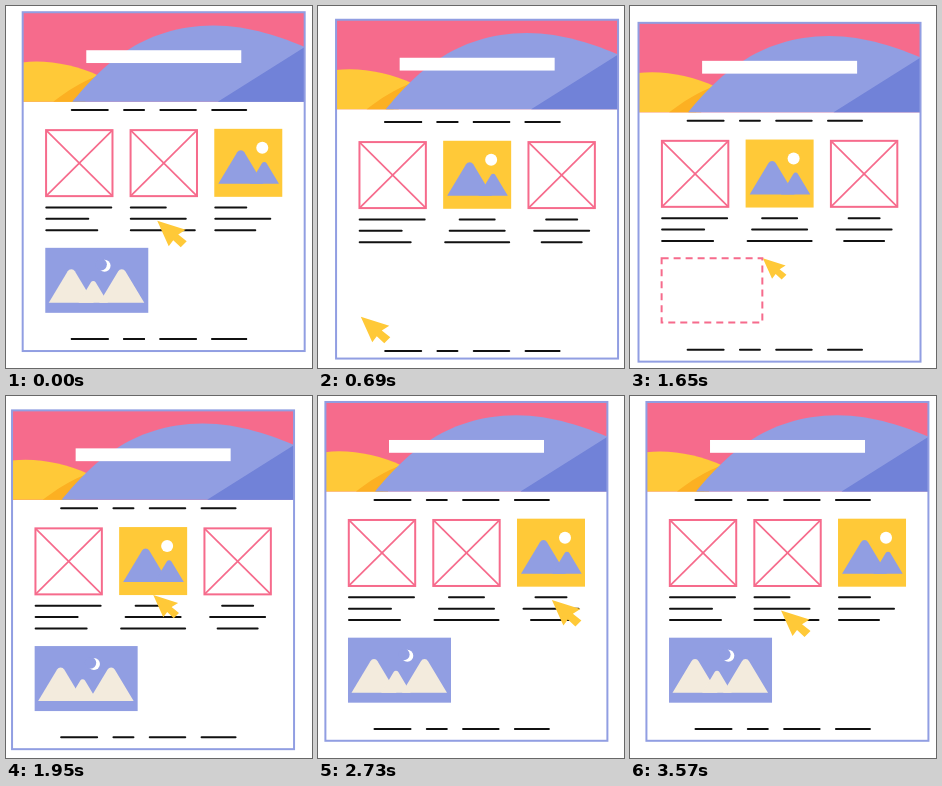
An HTML page with a canvas that plays this animation: 306 px wide and 362 px high, repeating every 3.6 s.

```html
<!DOCTYPE html>
<html lang="en">
<head>
<meta charset="utf-8">
<title>Page builder</title>
<style>
html, body { margin: 0; width: 306px; height: 362px; overflow: hidden; background: #fff; }
canvas { display: block; }
</style>
</head>
<body>
<canvas width="306" height="362"></canvas>
<script>
const ctx = document.querySelector('canvas').getContext('2d');
const LOOP = 3600, PITCH = 229, DRIFT = 6.75;
const PINK = '#f66b8c', BLUE = '#919ee2', DARK = '#7182d8',
      YELLOW = '#ffc938', ORANGE = '#fcb022', CREAM = '#f3ebdd', INK = '#111';
const NAV = [37, 21, 36.5, 35];
const TEXT = [[66, 43, 52], [36, 56, 65], [32, 56, 41]];
const columnX = i => 40 + 84.5 * i;
const cell = { x: 40, y: 242, w: 103, h: 65 };

const step = (start, end, x, y, drag = false) => ({ start, end, x, y, drag });
const scrolling = step(0, 840, cell.x, cell.y + cell.h - 2);
const drawing = step(950, 1770, cell.x + cell.w, cell.y - 1, true);
const reaching = step(1770, 1950, 158.6, 191);
const swapping = step(1980, 2560, 243.1, 191, true);
const aligningLast = step(2620, 2960, 244.5, 214.7);
const aligningMiddle = step(3000, 3480, 152, 214.7);
const STEPS = [scrolling, drawing, reaching, swapping, aligningLast, aligningMiddle];

const clamp = v => Math.min(1, Math.max(0, v));
const mix = (a, b, k) => a + (b - a) * k;

// cubic-bezier(.25, .1, .25, 1)
function ease(x) {
  let lo = 0, hi = 1, s = 0;
  for (let i = 0; i < 20; i++) {
    s = (lo + hi) / 2;
    if (.75 * s * (1 - s) + s ** 3 < clamp(x)) lo = s; else hi = s;
  }
  return .3 * s * (1 - s) ** 2 + 3 * s * s * (1 - s) + s ** 3;
}

const progress = (t, { start, end }) => ease((t - start) / (end - start));

function fill(color, path) {
  ctx.fillStyle = color;
  ctx.fill(new Path2D(path));
}

function rect(color, x, y, w, h) {
  ctx.fillStyle = color;
  ctx.fillRect(x, y, w, h);
}

function line(x1, y1, x2, y2) {
  ctx.beginPath();
  ctx.moveTo(x1, y1);
  ctx.lineTo(x2, y2);
  ctx.stroke();
}

function pen(color, width, cap = 'butt') {
  ctx.strokeStyle = color;
  ctx.lineWidth = width;
  ctx.lineCap = cap;
}

function at(x, y, draw) {
  ctx.save();
  ctx.translate(x, y);
  draw();
  ctx.restore();
}

function circle(color, x, y, r) {
  ctx.fillStyle = color;
  ctx.beginPath();
  ctx.arc(x, y, r, 0, 7);
  ctx.fill();
}

function peak(color, x, height) {
  const base = 55, half = height * .6;
  ctx.fillStyle = color;
  ctx.beginPath();
  ctx.moveTo(x - half, base);
  ctx.arcTo(x, base - height, x + half, base, height / 9);
  ctx.lineTo(x + half, base);
  ctx.fill();
}

function placeholder(x) {
  at(x, 123.5, () => {
    pen(PINK, 2);
    ctx.strokeRect(.8, .8, 66.4, 66);
    pen(PINK, 1.7);
    line(1, 1, 67, 66.5);
    line(67, 1, 1, 66.5);
  });
}

function dayPicture(x) {
  at(x, 123, () => {
    rect(YELLOW, 0, 0, 68, 68);
    circle('#fff', 48, 19, 6);
    peak(BLUE, 26.5, 37.5);
    peak(BLUE, 50, 24.5);
  });
}

function nightPicture() {
  at(cell.x, cell.y, () => {
    rect(BLUE, 0, 0, cell.w, cell.h);
    circle('#fff', 59.3, 18, 6);
    circle(BLUE, 55.8, 16.8, 5.8);
    peak(CREAM, 26, 37.5);
    peak(CREAM, 48, 24.5);
    peak(CREAM, 76.5, 37.5);
  });
}

function navigation(y) {
  let x = 66;
  for (const w of NAV) {
    line(x + .5, y, x + w - .5, y);
    x += w + 15.3;
  }
}

function content(offset, { swap, left, night }) {
  at(0, offset, () => {
    placeholder(columnX(0));
    placeholder(columnX(2 - swap));
    dayPicture(columnX(1 + swap));
    if (night) nightPicture();
    pen(INK, 2, 'round');
    navigation(104.3);
    navigation(104.3 + PITCH);
    TEXT.forEach((widths, col) => widths.forEach((w, row) => {
      const x = columnX(col) + (left[col] ? .5 : 34 - w / 2);
      const y = 201.6 + row * 11.4;
      line(x + .5, y, x + w - .5, y);
    }));
  });
}

function header() {
  rect(PINK, 17, 6, 282.5, 89.8);
  fill(YELLOW, 'M17 56.5C42 53.5 70 59 94 70L75 95.8H17Z');
  fill(ORANGE, 'M48 95.8C62 85 76 76 93 69.6L80 95.8Z');
  fill(BLUE, 'M67 95.8C95 62 135 20 208 19.5C245 19.5 278 32 299.5 41V95.8Z');
  fill(DARK, 'M212.5 95.8L299.5 41V95.8Z');
  rect('#fff', 81, 44.3, 155, 12.8);
}

function cursorAt(t) {
  let { x, y } = aligningMiddle, press = 0;
  for (const s of STEPS) {
    const k = progress(t, s);
    x = mix(x, s.x, k);
    y = mix(y, s.y, k);
    if (s.drag) press += clamp((t - s.start) / 80 + 1) - clamp((t - s.end) / 80 + 1);
  }
  return { x, y, press };
}

function cursor({ x, y, press }) {
  at(x, y, () => {
    ctx.scale(1 - .2 * press, 1 - .2 * press);
    fill(YELLOW, 'M0 0L28.5 9L21 13.8L29.5 20.5L23.5 26.5L16 19.5L11.5 25.5Z');
  });
}

function selection({ x, y }) {
  pen(PINK, 2);
  ctx.setLineDash([7, 5]);
  ctx.strokeRect(cell.x + .5, cell.y + cell.h - 1, x - cell.x - 1, y - cell.y - cell.h + 1);
  ctx.setLineDash([]);
}

function page(t) {
  const pointer = cursorAt(t), scroll = progress(t, scrolling);
  const placed = t > drawing.end - 30;
  ctx.save();
  ctx.beginPath();
  ctx.rect(17, 90, 282, 255);
  ctx.clip();
  if (t < scrolling.end) content(-PITCH * scroll, { swap: 1, left: [1, 1, 1], night: true });
  content(PITCH * (1 - scroll), {
    swap: progress(t, swapping),
    left: [true, t > aligningMiddle.end - 30, t > aligningLast.end - 30],
    night: placed
  });
  if (t > drawing.start && !placed) selection(pointer);
  ctx.restore();
  header();
  pen(BLUE, 2);
  ctx.strokeRect(17.4, 6.3, 282, 338.8);
  cursor(pointer);
}

function frame(now) {
  const t = now % LOOP;
  const angle = (t / LOOP - 1 / 8) * 2 * Math.PI;
  ctx.clearRect(0, 0, 306, 362);
  at(DRIFT * Math.cos(angle) - 5.5, DRIFT * Math.sin(angle) + 4.7, () => page(t));
  requestAnimationFrame(frame);
}
requestAnimationFrame(frame);
</script>
</body>
</html>
```
